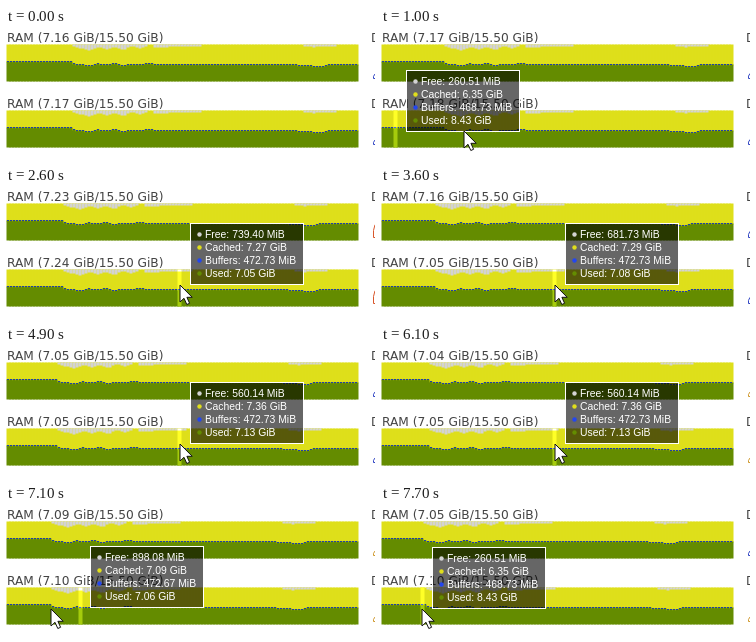
Animation, 369 px wide and 131 px high, one loop 8000 ms. Source, as an HTML page with a canvas:

```html
<!DOCTYPE html>
<html lang="en">
<head>
<meta charset="utf-8">
<title>RAM charts</title>
<style>
  html, body { margin: 0; width: 100%; height: 100%; overflow: hidden; background: #fff; }
  canvas, svg { position: absolute; left: 0; top: 0; width: 369px; height: 131px; }
  .title { font: 12.2px "DejaVu Sans", sans-serif; fill: #444; }
  .tip text { font: 10.4px "Liberation Sans", Arial, sans-serif; fill: #fff; }
  text { white-space: pre; }
</style>
</head>
<body>
<canvas width="369" height="131"></canvas>
<svg viewBox="0 0 369 131">
  <text class="title" id="title0" x="1" y="14"></text>
  <text class="title" id="title1" x="1" y="80"></text>
  <text class="title" x="365" y="14">D</text>
  <text class="title" x="365" y="80">D</text>
  <g class="tip" id="tip">
    <rect x=".5" y=".5" width="113" height="61" fill="#000" fill-opacity=".6" stroke="#fff"/>
    <circle cx="9.5" cy="11.5" r="2.2" fill="#d3d3d3"/><text x="15" y="15"></text>
    <circle cx="9.5" cy="24.5" r="2.2" fill="#e0de1c"/><text x="15" y="28"></text>
    <circle cx="9.5" cy="37.5" r="2.2" fill="#2346f0"/><text x="15" y="41"></text>
    <circle cx="9.5" cy="50.5" r="2.2" fill="#648c00"/><text x="15" y="54"></text>
  </g>
  <path id="cursor" d="M0 0V17L4 13.3L6.8 19.5L9.6 18.3L6.9 12.3H12.2Z" fill="#fff" stroke="#111" stroke-linejoin="round"/>
</svg>
<script>
const LOOP = 8000, STEP = 100, TOTAL = 15.5, HEIGHT = 36, BAR = 3, BARS = 117;
const ENTER = 700, TIP_LAG = 200;
const ctx = document.querySelector("canvas").getContext("2d");
const byId = id => document.getElementById(id);
const tip = byId("tip"), cursor = byId("cursor"), rows = tip.querySelectorAll("text");

const color = { free: "#d3d3d3", cached: "#dedf1b", used: "#648c00", buffers: "#1f3fa8" };
const lit = { free: "#fff", cached: "#ffff27", used: "#a5cc0c", buffers: "#4060ff" };

const charts = [
  { top: 17, first: 300, period: 1055, totals: "7.16 7.17 7.19 7.23 7.16 7.05 7.04 7.09 7.05".split(" ") },
  { top: 83, first: 360, period: 1080, totals: "7.17 7.18 7.19 7.24 7.05 7.05 7.05 7.10".split(" ") }
];

// [bar, GiB]
const usedPoints = [[0, 8.5], [21, 8.43], [22, 7.5], [24, 7.05], [67, 7.28], [86, 7.2],
  [99, 6.8], [102, 6.3], [105, 6.3], [107, 6.9], [126, 7.1]];
const freePoints = [[0, .25], [21, .25], [24, 1.7], [37, 1.5], [41, .9], [53, .88], [67, .33],
  [98, .4], [102, .9], [112, .3], [126, .4]];

// [ms, x] of the pointer
const path = [[ENTER, 5], [1400, 206], [1700, 174], [6300, 174], [7200, 41], [LOOP, 41]];

// From ms on: free MiB, cached GiB, buffers MiB, used GiB
const readings = [
  [0, "260.51", "6.35", "468.73", "8.43"],
  [1200, "341.93", "7.43", "472.75", "7.28"],
  [1700, "739.40", "7.27", "472.73", "7.05"],
  [3100, "681.73", "7.29", "472.73", "7.08"],
  [4300, "560.14", "7.36", "472.73", "7.13"],
  [6700, "898.08", "7.09", "472.67", "7.06"],
  [7200, "260.51", "6.35", "468.73", "8.43"]
];

const linear = p => p;
const smooth = p => (1 - Math.cos(Math.PI * p)) / 2;

function interpolate(points, at, ease) {
  const i = Math.max(1, points.findIndex(p => p[0] >= at));
  const [x0, y0] = points[i - 1], [x1, y1] = points[i];
  return y0 + (y1 - y0) * ease((at - x0) / (x1 - x0));
}

// The pointer rises along a flat arc as it moves right
function pointerAt(t) {
  if (t < ENTER) return null;
  const x = Math.round(interpolate(path, t, smooth));
  return { x, y: Math.floor(104.05 - 10 * (x / 206) ** 4) };
}

const updatesAt = (chart, t) => Math.max(0, Math.floor((t - chart.first) / chart.period) + 1);
const wobble = k => k > 23 && k < 50 ? Math.sin(k * 1.1) * .22 + Math.sin(k * .43) * .12 : 0;
const toPx = gib => Math.floor(gib * HEIGHT / TOTAL);

function block(fill, x, y, h) {
  ctx.fillStyle = ctx.strokeStyle = fill;
  ctx.fillRect(x, y, BAR, h);
  ctx.strokeRect(x, y, BAR, h);
}

function drawBar(i, top, k, c) {
  const x = 1 + i * BAR;
  const free = toPx(interpolate(freePoints, k, linear) - wobble(k) * 2);
  const used = toPx(interpolate(usedPoints, k, linear) + wobble(k));
  const line = top + HEIGHT - used;
  block(c.cached, x, top, HEIGHT - used);
  if (free > 0) block(c.free, x, top, free);
  block(c.used, x, line, used);
  ctx.fillStyle = c.buffers;
  ctx.fillRect(x, line - 1, 2, 1);
}

// Visible edge of the neighbouring chart
function drawSliver(base, n) {
  const size = 6 + 9 * Math.exp(-((n - 2.7) ** 2));
  ctx.strokeStyle = n % 4 < 2 ? "#3347c4" : n < 4 ? "#d8572c" : "#d09a30";
  ctx.beginPath();
  ctx.moveTo(369, base - size);
  ctx.lineTo(367.5, base - size * .6);
  ctx.lineTo(367.5, base - 1.5);
  ctx.lineTo(369, base - 1.5);
  ctx.stroke();
}

function drawChart(chart, id, t, hover) {
  const n = updatesAt(chart, t);
  for (let i = 0; i < BARS; i++) drawBar(i, chart.top, n + i, color);
  if (hover !== null) drawBar(hover, chart.top, n + hover, lit);
  drawSliver(chart.top + HEIGHT - 1, n);
  byId("title" + id).textContent = `RAM (${chart.totals[n]} GiB/15.50 GiB)`;
}

function place(node, point, dx, dy) {
  node.style.display = point ? "" : "none";
  if (point) node.setAttribute("transform", `translate(${point.x + dx} ${point.y + dy})`);
}

function draw(t) {
  ctx.clearRect(0, 0, 369, 131);
  const hovered = pointerAt(t - TIP_LAG);
  drawChart(charts[0], 0, t, null);
  drawChart(charts[1], 1, t, hovered && Math.floor((hovered.x - 1) / BAR));
  place(tip, hovered, 10, -62);
  place(cursor, pointerAt(t), 0, 0);
  const [, free, cached, buffers, used] = readings.filter(r => r[0] <= t).pop();
  [`Free: ${free} MiB`, `Cached: ${cached} GiB`, `Buffers: ${buffers} MiB`, `Used: ${used} GiB`]
    .forEach((line, i) => { rows[i].textContent = line; });
}

const start = performance.now();
function tick() {
  const t = (performance.now() - start) % LOOP;
  draw(Math.floor(t / STEP) * STEP);
  requestAnimationFrame(tick);
}
tick();
</script>
</body>
</html>
```
